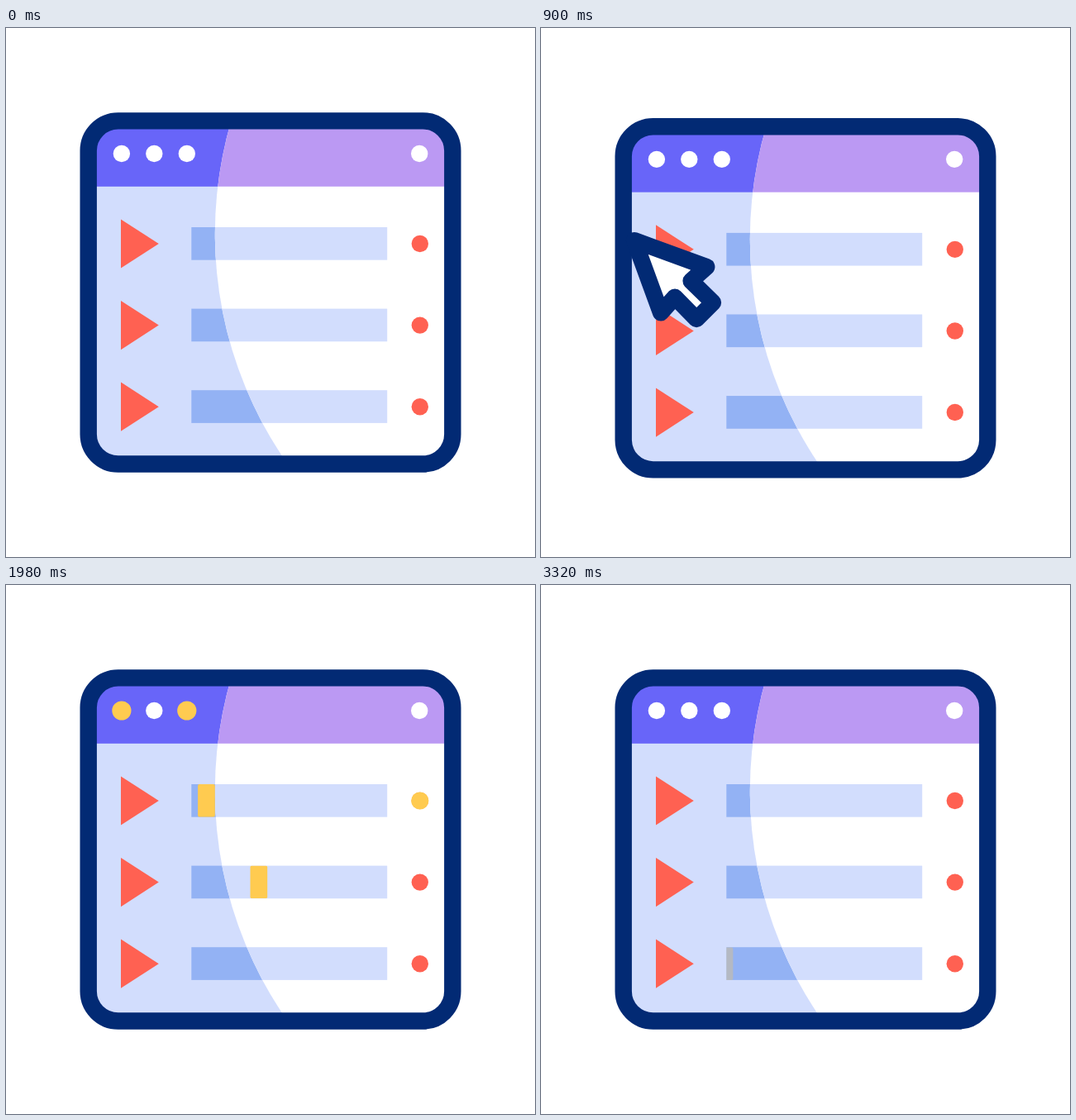
Recreate the animation shown at these times as an HTML page. Size 640 by 640 pixels, loop 3600 ms.

```html
<!DOCTYPE html>
<html lang="en">
<head>
<meta charset="utf-8">
<title>Playlist window</title>
<style>
  html, body { margin: 0; width: 100%; height: 100%; overflow: hidden; background: #fff; }
  svg { display: block; width: 100vw; height: 100vh; }
</style>
</head>
<body>
<svg viewBox="0 0 640 640">
  <defs>
    <clipPath id="frame"><rect x="99.7" y="112.4" width="440.6" height="415.1" rx="36"/></clipPath>
    <clipPath id="light"><circle cx="737.8" cy="249" r="485"/></clipPath>
    <clipPath id="bars"></clipPath>
  </defs>
  <g id="win">
    <g clip-path="url(#frame)">
      <rect x="99" y="112" width="442" height="416" fill="#d2ddfd"/>
      <rect x="99" y="112" width="442" height="79.8" fill="#6865f9"/>
      <g id="shade" fill="#93b2f4"></g>
      <g clip-path="url(#light)">
        <rect x="99" y="112" width="442" height="416" fill="#fff"/>
        <rect x="99" y="112" width="442" height="79.8" fill="#bb99f3"/>
        <g id="tint" fill="#d2ddfd"></g>
      </g>
    </g>
    <g id="knobs" fill="#ffcb50" clip-path="url(#bars)"></g>
    <g id="plays" fill="#ff6152"></g>
    <g id="dots"></g>
    <rect x="99.7" y="112.4" width="440.6" height="415.1" rx="36" fill="none" stroke="#022a74" stroke-width="20.4"/>
  </g>
  <path id="cursor" fill="#fff" stroke="#022a74" stroke-width="20" stroke-linejoin="round"/>
</svg>
<script>
const LOOP = 3600, PITCH = 98.6, ROW = 261;
const RED = '#ff6152', WHITE = '#fff', YELLOW = '#ffcb50';
const $ = id => document.getElementById(id);

function add(parent, tag, attrs) {
  const el = document.createElementNS('http://www.w3.org/2000/svg', tag);
  for (const k in attrs) el.setAttribute(k, attrs[k]);
  return $(parent).appendChild(el);
}

const clamp = v => Math.min(1, Math.max(0, v));
const ramp = (t, a, b) => { const x = clamp((t - a) / (b - a)); return x * x * (3 - 2 * x); };
const pulse = (t, start, length) => Math.sin(Math.PI * clamp((t - start) / length)) ** 2;

// Moments when the highlighted dots switch.
const BEATS = [1350, 2040, 2640, 3200];
const lit = (t, n) => ramp(t, BEATS[n], BEATS[n] + 50) - ramp(t, BEATS[n + 1], BEATS[n + 1] + 50);

function dot(x, y, color, big, steps) {
  add('dots', 'circle', { cx: x, cy: y, r: 10.2, fill: color });
  return { el: add('dots', 'circle', { cx: x, cy: y, r: 0, fill: YELLOW }), big, steps };
}

const dots = [
  dot(139.9, 152, WHITE, 11.6, [0, 2]),
  dot(179.3, 152, WHITE, 11.6, [1]),
  dot(218.8, 152, WHITE, 11.6, [0, 2])
];
add('dots', 'circle', { cx: 500.2, cy: 152, r: 10.2, fill: WHITE });

// Knob start and one-way travel time, play button press, remaining opacity.
const rows = [
  { start: 1262, travel: 396, press: 530, rest: 0 },
  { start: 1804, travel: 417, press: 1065, rest: 0 },
  { start: 2352, travel: 470, press: 1600, rest: 0.3 }
].map((row, i) => {
  const y = ROW + i * PITCH;
  const bar = { x: 224.3, y: y - 20, width: 236.9, height: 39.7 };
  for (const layer of ['shade', 'tint', 'bars']) add(layer, 'rect', bar);
  dots.push(dot(500.8, y, RED, 10.6, [i]));
  return {
    ...row, y,
    knob: add('knobs', 'rect', { y: y - 20, width: 20.7, height: 39.7, rx: 2 }),
    play: add('plays', 'path', { d: 'M-23-29.6L22.8 0L-23 29.6Z' })
  };
});

function drawRow(row, t) {
  const turn = row.start + row.travel, end = turn + row.travel;
  const x = 214 + 237 * ramp(t, row.start, turn) - 229 * ramp(t, turn, end);
  row.knob.setAttribute('x', x - 10.35);
  row.knob.setAttribute('opacity', t < row.start ? 0 : 1 - (1 - row.rest) * ramp(t, end - 30, end + 28));
  const s = 1 - 0.33 * pulse(t, row.press, 230);
  row.play.setAttribute('transform', `translate(162 ${row.y}) scale(${s})`);
}

const BODY = [[87.5, 32], [68.5, 49], [95.2, 75.2], [75.2, 95.2], [49, 68.5], [32, 87.5]];

function drawCursor(t) {
  const x = -106 + 268.5 * (ramp(t, 0, 540) - ramp(t, 800, 1168));
  const p = pulse(t, 530, 230);
  const tip = [x + 3 * p, 257 + 3 * p];
  const body = BODY.map(([a, b]) => [x + a - 8 * p, 257 + b - 8 * p]);
  $('cursor').setAttribute('d', 'M' + [tip, ...body].join('L') + 'Z');
  $('cursor').setAttribute('visibility', t < 20 || t > 1168 ? 'hidden' : 'visible');
}

function draw(t) {
  const drop = 7.7 * (ramp(t, 520, 780) - ramp(t, 850, 1100));
  $('win').setAttribute('transform', `translate(0 ${drop})`);
  rows.forEach(row => drawRow(row, t));
  for (const d of dots) {
    d.el.setAttribute('r', d.big * d.steps.reduce((sum, n) => sum + lit(t, n), 0));
  }
  drawCursor(t);
}

const begin = performance.now();
function tick() {
  draw((performance.now() - begin) % LOOP);
  requestAnimationFrame(tick);
}
tick();
</script>
</body>
</html>
```
